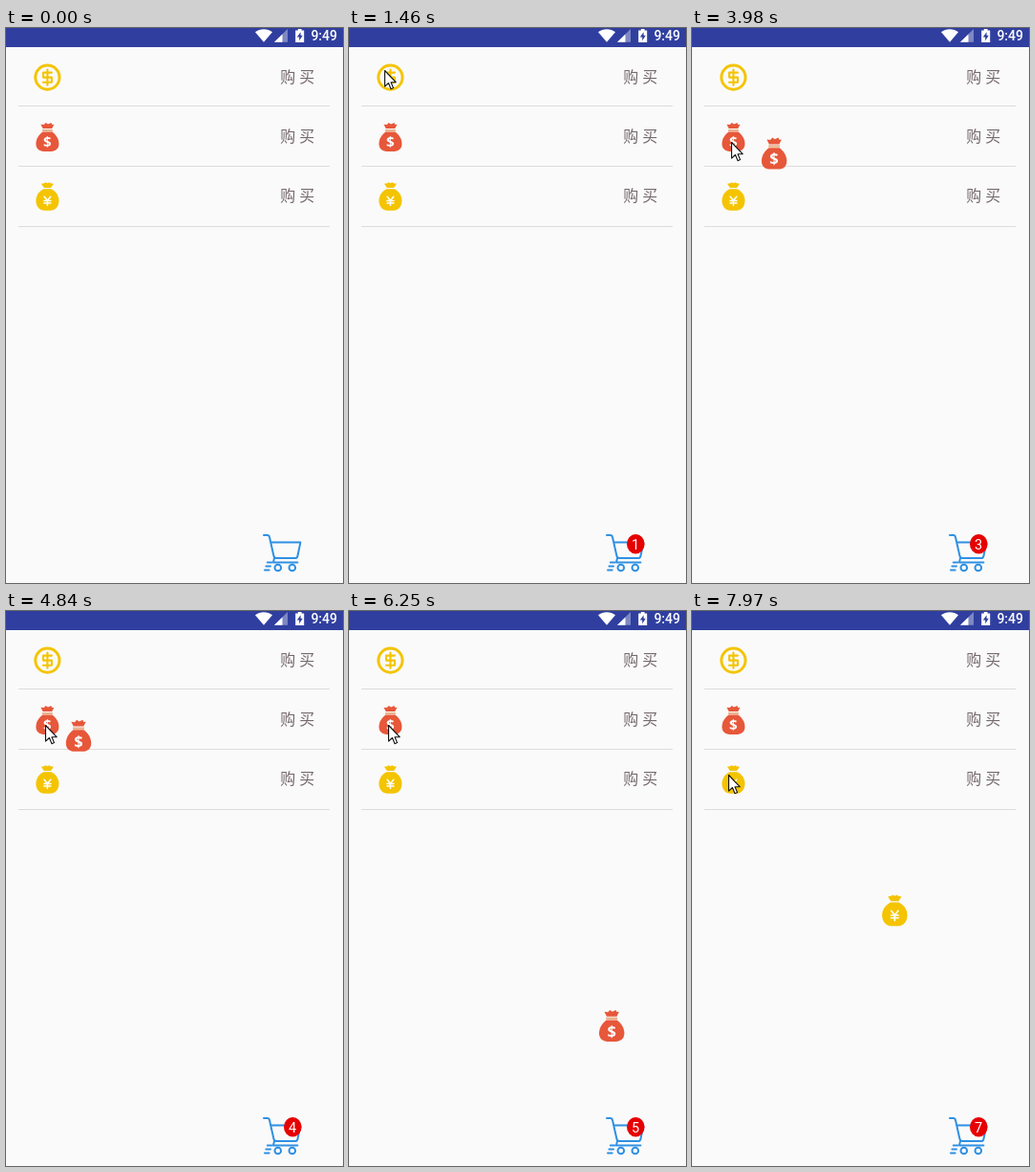
Animation, 353 px wide and 580 px high, one loop 8 s. Source, as an HTML page with a canvas:

```html
<!DOCTYPE html>
<html lang="zh-CN">
<head>
<meta charset="utf-8">
<title>Cart</title>
<style>
html, body { margin: 0; width: 100%; height: 100%; overflow: hidden; background: #fafafa; }
canvas { display: block; width: 353px; height: 580px; }
</style>
</head>
<body>
<canvas id="stage"></canvas>
<script>
const W = 353, H = 580, LOOP = 8000;
const STEP = 77, FLIGHT = 615;
const YELLOW = '#f4c400', RED = '#e7573a', BLUE = '#2f90e3', PAPER = '#fafafa';

const canvas = document.getElementById('stage');
const ctx = canvas.getContext('2d');
const dpr = window.devicePixelRatio || 1;
canvas.width = W * dpr;
canvas.height = H * dpr;

// Each purchase: icon, first shown at, flight time already passed by then
const BUYS = [
  [0, 920, 121], [0, 1860, 79], [0, 2720, 121],
  [1, 3980, 82], [1, 4840, 0], [1, 5780, 0],
  [2, 6780, 39], [2, 7730, 110]
];
// Pointer moves: start, duration, target
const MOVES = [[70, 610, 37, 44], [3260, 400, 41, 119], [6470, 80, 38, 171]];

const lerp = (a, b, f) => a + (b - a) * f;
const ease = f => .5 - .5 * Math.cos(Math.PI * f);
const stepped = ms => Math.floor(ms / STEP) * STEP;
const iconY = i => 51.6 + i * 62.3;

function fill(d, color) {
  ctx.fillStyle = color;
  ctx.fill(new Path2D(d));
}

function stroke(d, color, width) {
  ctx.strokeStyle = color;
  ctx.lineWidth = width;
  ctx.lineCap = ctx.lineJoin = 'round';
  ctx.stroke(new Path2D(d));
}

function ring(x, y, r, color, width) {
  ctx.beginPath();
  ctx.arc(x, y, r, 0, Math.PI * 2);
  ctx.strokeStyle = color;
  ctx.lineWidth = width;
  ctx.stroke();
}

function text(s, x, y, font, color, align = 'left') {
  ctx.font = font;
  ctx.fillStyle = color;
  ctx.textAlign = align;
  ctx.fillText(s, x, y);
}

function at(x, y, scale, paint) {
  ctx.save();
  ctx.translate(x, y);
  ctx.scale(scale, scale);
  paint();
  ctx.restore();
}

function coin() {
  ring(0, 0, 12.6, YELLOW, 3);
  stroke('M4.5 -5H-4.4V0H4.5V5.2H-4.5M0 -8V8.2', YELLOW, 2.1);
}

function redBag() {
  fill('M-7 -13.2L-3.6 -12.8L-1.8 -15L.6 -13.4L4 -15L4.8 -13L7 -13.2L4.8 -8.8H-4.8Z', RED);
  fill('M-5.4 -8H5.4V-5.8H-5.4Z', '#e9b38c');
  fill('M-5 -5.4C-9 -2.5 -12 2 -12 7.2C-12 12.4 -8.5 15 -4 15H4C8.5 15 12 12.4 12 7.2C12 2 9 -2.5 5 -5.4Z', RED);
  text('$', 0, 10.3, '600 15px "Noto Sans", Roboto, sans-serif', '#fff', 'center');
}

function yellowBag() {
  fill('M-6.5 -13.4L-3.4 -14L-1.8 -15L0 -14L1.8 -15L3.4 -14L6.5 -13.4L3.6 -9.2H-3.6Z', YELLOW);
  fill('M-4 -8C-9 -5.5 -12 -1 -12 4.2C-12 10.4 -8 14.5 -3 14.5H3C8 14.5 12 10.4 12 4.2C12 -1 9 -5.5 4 -8Z', YELLOW);
  stroke('M-3.3 0L0 4L3.3 0M0 4V9.4M-3.5 4.3H3.5M-3.5 6.8H3.5', '#fff', 1.5);
}

const ICONS = [coin, redBag, yellowBag];

function statusBar() {
  ctx.fillStyle = '#303f9f';
  ctx.fillRect(0, 0, W, 20);
  fill('M261 4.2C266 .2 274 .2 279 4.2L270 14.8Z', '#fff');
  fill('M281 14.8L295 1V14.8Z', 'rgba(255,255,255,.38)');
  fill('M281 14.8L289.5 6.4V14.8Z', '#fff');
  fill('M303.2 2.4H305.8V1H309.6V2.4H312.2V15H303.2Z', '#fff');
  fill('M308.6 4.2L304.8 9.6H307.2V13.2L310.8 7.8H308.6Z', '#303f9f');
  text('9:49', 319.4, 13, '500 14px Roboto, sans-serif', '#fff');
}

function list() {
  const font = '16px "Noto Sans CJK SC", "Noto Sans CJK", sans-serif';
  ICONS.forEach((icon, i) => {
    at(43.4, iconY(i), 1, icon);
    const base = Math.round(56.6 + i * 62.4);
    text('购', 287.3, base, font, '#75696d');
    text('买', 307.3, base, font, '#75696d');
    ctx.fillStyle = '#dcdcdc';
    ctx.fillRect(13, Math.floor(81.6 + i * 62.7), 326, 1);
  });
}

function cart() {
  stroke('M270 530H273.6Q275.6 530 276 532L280.4 551.5Q281 554 283 554H303Q305 554 305.4 552L308.4 537.6H277.4', BLUE, 2);
  stroke('M281 554L280 558.4H305.4', BLUE, 2);
  for (let i = 0; i < 3; i++) {
    const x = 273.8 - i * 1.4;
    stroke(`M${x} ${558.5 + i * 4}h4.6`, BLUE, 2);
  }
  for (const x of [284.8, 299.8]) ring(x, 564, 3.3, BLUE, 2);
}

function badge(n) {
  ctx.beginPath();
  ctx.ellipse(300.3, 539.3, 9.3, 10.3, 0, 0, Math.PI * 2);
  ctx.fillStyle = '#e60000';
  ctx.fill();
  text(n, 300, 544.5, '14.5px Roboto, sans-serif', '#fff', 'center');
}

function fly(icon, u) {
  const p = ease(u);
  at(lerp(76, 309, p), lerp(iconY(icon) + 16.4, 545, p * p), 1.1, ICONS[icon]);
}

function buys(t) {
  let landed = 0;
  const flying = [];
  for (const [icon, from, lead] of BUYS) {
    if (t < from) break;
    const u = (lead + stepped(t - from)) / FLIGHT;
    if (u < 1) flying.push([icon, u]);
    else landed++;
  }
  if (landed) badge(landed);
  for (const [icon, u] of flying) fly(icon, u);
}

function pointer(t) {
  if (t < MOVES[0][0]) return;
  let x = 227, y = 492;
  for (const [from, time, toX, toY] of MOVES) {
    if (t < from) break;
    const f = ease(Math.min(1, stepped(t - from) / (time - time % STEP)));
    x = lerp(x, toX, f);
    y = lerp(y, toY, f);
  }
  at(x + .5, y + .5, 1, () => {
    const d = 'M0 0V16.6L3.9 13L6.5 19.2L9 18.1L6.5 12.2H11.6Z';
    fill(d, '#fff');
    stroke(d, '#111', 1.1);
  });
}

function draw(t) {
  ctx.setTransform(dpr, 0, 0, dpr, 0, 0);
  ctx.fillStyle = PAPER;
  ctx.fillRect(0, 0, W, H);
  statusBar();
  list();
  cart();
  buys(t);
  pointer(t);
}

const start = performance.now();
function tick() {
  draw((performance.now() - start) % LOOP);
  requestAnimationFrame(tick);
}
tick();
</script>
</body>
</html>
```
